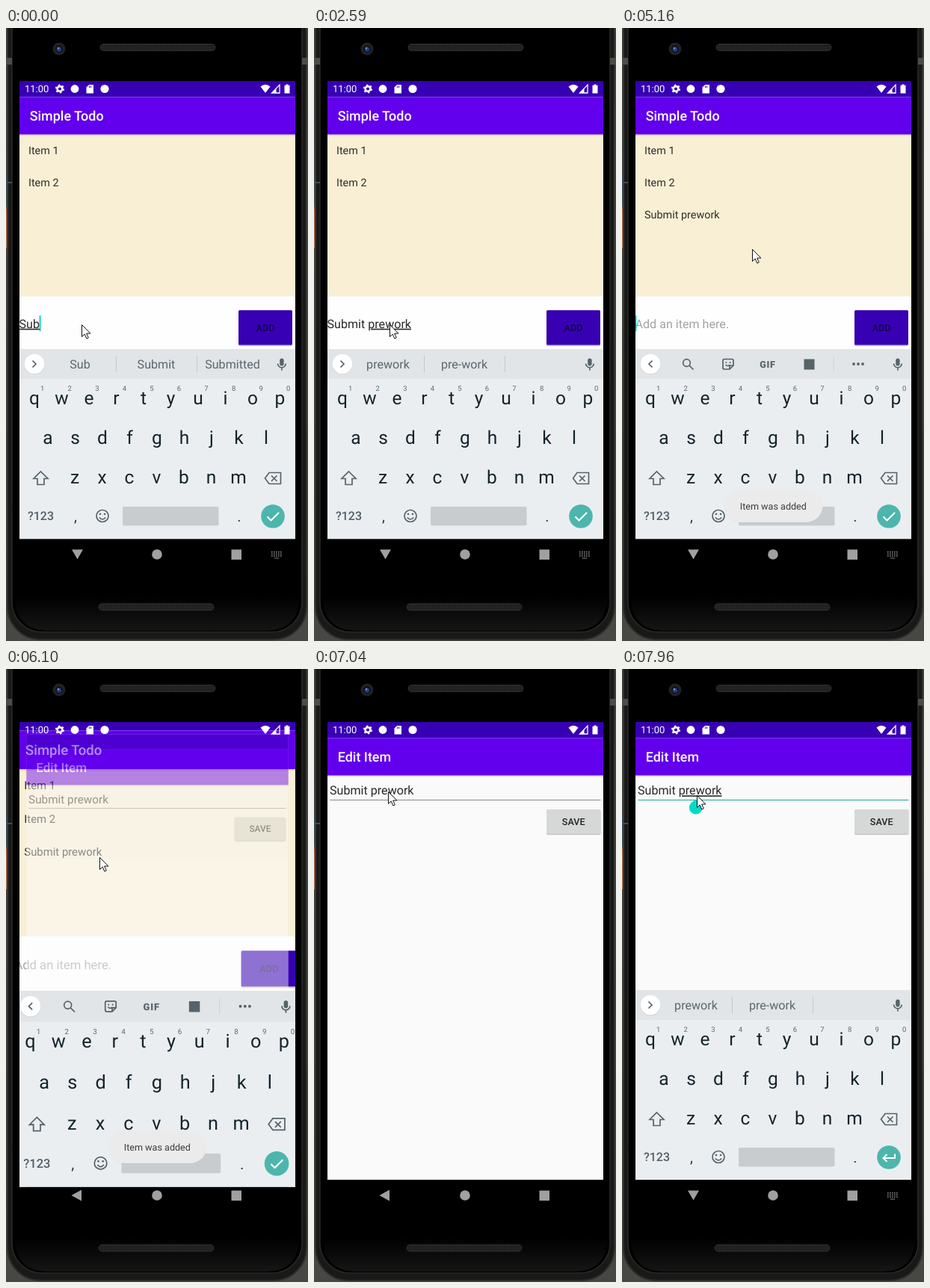
These frames come from a looping animation (404x821 px, 8 s). An HTML page:

```html
<!DOCTYPE html>
<html lang="en">
<head>
<meta charset="utf-8">
<title>Simple Todo</title>
<style>
html, body { margin: 0; width: 100%; height: 100%; overflow: hidden; background: #000; }
svg { display: block; width: 100vw; height: 100vh; }
text { font-family: Roboto, sans-serif; white-space: pre; text-rendering: geometricPrecision; }
.m { font-weight: 500; }
.mid { text-anchor: middle; }
.u { text-decoration: underline #444 .9px; }
.ic { fill: none; stroke: #56636a; stroke-width: 1.7; }
</style>
</head>
<body>
<svg id="stage" viewBox="0 0 404 821" preserveAspectRatio="none"></svg>
<script>
const LOOP = 8000;

const rect = (x, y, w, h, fill, more = '') =>
  `<rect x="${x}" y="${y}" width="${w}" height="${h}" fill="${fill}" ${more}/>`;
const circle = (x, y, r, fill, more = '') =>
  `<circle cx="${x}" cy="${y}" r="${r}" fill="${fill}" ${more}/>`;
const path = (d, more = 'class="ic"') => `<path d="${d}" ${more}/>`;
const text = (x, y, size, fill, str, more = '') =>
  `<text x="${x}" y="${y}" font-size="${size}" fill="${fill}" ${more}>${str}</text>`;
const group = (id, body, more = '') => `<g id="${id}" ${more}>${body}</g>`;

const defs = `<defs>
  <clipPath id="screen"><rect x="18" y="71" width="369" height="656"/></clipPath>
  <clipPath id="aboveNav"><rect x="18" y="71" width="369" height="613.3"/></clipPath>
  <linearGradient id="shade" x2="0" y2="1"><stop stop-color="#000" stop-opacity=".16"/>
    <stop offset="1" stop-color="#000" stop-opacity="0"/></linearGradient>
  <linearGradient id="rim" x2="0" y2="1"><stop stop-color="#2c2c2a"/>
    <stop offset=".3" stop-color="#3a3a38"/><stop offset="1" stop-color="#2c2c2a"/></linearGradient>
  <linearGradient id="desk" x2="0" y2="1"><stop stop-color="#35505c"/>
    <stop offset=".4" stop-color="#4a5a60"/><stop offset=".5" stop-color="#b56a42"/>
    <stop offset="1" stop-color="#c08050"/></linearGradient>
  <linearGradient id="chin" x2="0" y2="1"><stop stop-color="#000"/><stop offset="1" stop-color="#161616"/></linearGradient>
  <pattern id="mesh" width="3" height="3" patternUnits="userSpaceOnUse">
    <rect width="3" height="3" fill="#1d1d1d"/><circle cx="1.5" cy="1.5" r=".8" fill="#343434"/></pattern>
</defs>`;

const grille = (x, y) => rect(x, y, 154, 9, 'url(#mesh)', 'rx="4.5" stroke="#2e2e2e"');

const phone = rect(0, 0, 404, 821, '#474743')
  + rect(0, 195, 2, 100, 'url(#desk)')
  + rect(2, -60, 400, 879, '#191918', 'rx="44" stroke="url(#rim)" stroke-width="2"')
  + rect(8, -60, 388, 869, '#000', 'rx="40" stroke="#2a2a29" stroke-width="1.5"')
  + path('M11 762H393Q391 806 350 807H54Q13 806 11 762Z', 'fill="url(#chin)"')
  + rect(0, 40, 8, 9, '#4c4c49') + rect(396, 40, 8, 9, '#4c4c49')
  + rect(0, 206, 8, 2, '#4c4c49')
  + circle(71, 28, 8.5, '#202226') + circle(71, 28, 5, '#10131f')
  + circle(71, 28.5, 3, '#23408f') + circle(70, 27, 1.2, '#7d9be0')
  + grille(126, 21.5) + grille(124, 771);

const bars = title => rect(18, 71, 369, 21.5, '#3700b3') + rect(18, 92.5, 369, 50, '#6200ee')
  + text(31.7, 124, 17.95, '#fff', title, 'class="m"') + rect(18, 142.5, 369, 3, 'url(#shade)');

const button = (x, y, w, h, fill, ink, label) =>
  rect(x, y + 1, w, h + .8, '#000', 'rx="2" opacity=".2"') + rect(x, y, w, h, fill, 'rx="1.5"')
  + text(x + w / 2, y + h / 2 + 4.6, 12.6, ink, label, 'class="m mid"');

const navBar = rect(18, 684.3, 369, 43, '#000');

const item = (n, label) => text(30, 169 + 43.1 * n, 14.4, '#2e2c26', label, `id="item${n}"`);

const home = rect(18, 71, 369, 613.3, '#fefefe') + navBar + rect(18, 142, 369, 217.5, '#f8efd5') + bars('Simple Todo')
  + item(0, 'Item 1') + item(1, 'Item 2') + item(2, 'Submit prework')
  + `<text id="input" x="17.5" y="401.7" font-size="16.1" fill="#282828"><tspan id="done"></tspan><tspan id="word" class="u"></tspan></text>`
  + text(17.5, 401.7, 16.1, '#a2a2a2', 'Add an item here.', 'id="hint"')
  + rect(0, 385, 1.8, 21, '#03d0bd', 'id="caret"')
  + button(311, 378, 72, 46.5, '#3700b3', '#12003c', 'ADD');

const edit = rect(18, 71, 369, 613.3, '#fafafa') + navBar + bars('Edit Item')
  + `<text x="21" y="168.3" font-size="16.1" fill="#282828">Submit <tspan id="editWord">prework</tspan></text>`
  + rect(21.5, 175, 362, 1, '#868686', 'id="rule"')
  + button(311, 188, 72.5, 32.5, '#d6d7d7', '#222', 'SAVE')
  + path('M98.7 174.5l5.7 4.6a8.8 8.8 0 1 1-11.4 0z', 'id="handle" fill="#03dac5"');

const keyRow = (keys, x, y) => [...keys].map((k, i) =>
  text(x + 36.5 * i, y, 24.5, '#13242b', k, 'class="mid"')).join('');
const digits = [...'1234567890'].map((d, i) =>
  text(48.7 + 36.55 * i, 486, 9.5, '#5c696f', d, 'class="mid"')).join('');

const suggest = [99, 201, 303].map((x, i) =>
  text(x, 456, 16.1, '#5a676d', '', `class="mid" id="s${i}"`)).join('')
  + path('M147.5 439v22M255.5 439v22', 'stroke="#c2c8cb"') + path('M35.5 445.5l4.5 4.5-4.5 4.5');

const tools = path('M40.5 445.5l-4.5 4.5 4.5 4.5')
  + circle(86.5, 448.5, 4.8, 'none', 'class="ic"') + path('M90 452l5.5 5.5')
  + path('M137 443.5h10a2 2 0 0 1 2 2v6.5l-5 5h-7a2 2 0 0 1-2-2v-9.5a2 2 0 0 1 2-2zM149 452h-5v5M138.5 451q3 3 5.5 0')
  + circle(139.3, 448, 1, '#56636a') + circle(144.7, 448, 1, '#56636a')
  + text(195, 454.7, 12.5, '#56636a', 'GIF', 'class="mid" font-weight="900" letter-spacing=".8"')
  + rect(243.5, 443.5, 14, 14, '#56636a') + path('M283 440v20', 'stroke="#cdd2d5"')
  + [310, 316, 322].map(x => circle(x, 450, 1.9, '#56636a')).join('');

const keyboard = rect(18, 430, 369, 254.3, '#ebeef1') + rect(18, 430, 369, 40, '#e1e5e8')
  + circle(38, 450.7, 13.6, '#000', 'opacity=".1"') + circle(38, 450, 13.3, '#fff')
  + group('suggest', suggest) + group('tools', tools)
  + rect(366.2, 442.5, 5.4, 10, '#56636a', 'rx="2.7"') + path('M363.6 449.5a5.3 5.3 0 0 0 10.6 0M369 455v3.5')
  + digits + keyRow('qwertyuiop', 38, 504) + keyRow('asdfghjkl', 56, 556.8) + keyRow('zxcvbnm', 92, 610)
  + path('M46.5 594l9.5 9.5h-5v8h-9v-8h-5z')
  + path('M352 595.5h15.5v15h-15.5l-5.5-7.5zM355 599.5l7.5 7.5M362.5 599.5l-7.5 7.5')
  + text(46.5, 659.3, 16, '#526067', '?123', 'class="m mid"')
  + text(93, 661, 20, '#2b3a41', ',', 'class="mid"') + text(312, 661, 20, '#2b3a41', '.', 'class="mid"')
  + circle(129, 653.5, 8, 'none', 'class="ic"') + path('M124.8 655.5q4.2 5 8.4 0')
  + circle(126, 651, 1.3, '#56636a') + circle(132, 651, 1.3, '#56636a')
  + rect(156, 641, 128.5, 25.5, '#c8cccf', 'rx="2"') + circle(357, 654, 15.8, '#4db6ac')
  + path('M349.5 654.5l5 5 10.5-10.5', 'id="check" fill="none" stroke="#fff" stroke-width="2"')
  + path('M365 649.5v5.5h-15M354.5 650l-5 5 5 5', 'id="enter" fill="none" stroke="#fff" stroke-width="2"');

const toast = rect(137, 618.5, 131.5, 44, '#000', 'rx="22" opacity=".05"')
  + rect(137, 618, 131.5, 44, '#ebebec', 'rx="22"')
  + text(202.3, 645, 12.6, '#3c3c3c', 'Item was added', 'class="mid"');

let dots = '';
for (let i = 0; i < 15; i++) dots += rect(355 + i % 5 * 3, 701 + (i / 5 | 0) * 2.7, 1.6, 1.5, '#8c8c8c');
dots += rect(359, 709.5, 6, 1, '#8c8c8c');

const nav = path('M88 698.5h15l-7.5 13z', 'id="down" fill="#a0a0a0"')
  + path('M101 697.5v15l-13.5-7.5z', 'id="back" fill="#a0a0a0"')
  + circle(202, 705, 6.8, '#a0a0a0') + rect(301.5, 698.5, 13.5, 13.5, '#a0a0a0') + group('dots', dots);

const status = text(25, 86.3, 13, '#fff', '11:00')
  + circle(72, 81.5, 3.4, 'none', 'stroke="#fff" stroke-width="2.6"')
  + circle(72, 81.5, 5.2, 'none', 'stroke="#fff" stroke-width="1.7" stroke-dasharray="2.4 3.045"')
  + circle(92, 81.5, 5.4, '#fff')
  + path('M111 76h6v11.5h-9.5v-8z', 'fill="#fff"') + path('M111.5 77.5v2.5M113.5 77.5v2.5', 'stroke="#3700b3"')
  + circle(132, 81.5, 5.6, '#fff')
  + path('M340.5 78.5q6.5-5.5 13 0l-6.5 8.5z', 'fill="#fff"')
  + path('M366 76v11h-10.5z', 'fill="none" stroke="#fff" stroke-width="1.3"') + path('M361.5 81v6h-6z', 'fill="#fff"')
  + path('M374.5 75.5h3v1.3h2v10.7h-7v-10.7h2z', 'fill="#fff"');

const pointer = path('M0 0V16l3.7-3.5 2.6 6 2.5-1.1-2.6-5.8h5.2z',
  'fill="#fff" stroke="#111" stroke-width="1"');

const stage = document.getElementById('stage');
stage.innerHTML = defs + phone + `<g clip-path="url(#screen)">`
  + rect(18, 71, 369, 656, '#000') + group('home', home) + group('edit', edit)
  + group('kbClip', group('kb', keyboard)) + group('toast', toast) + group('nav', nav) + status + '</g>'
  + group('mouse', pointer);

const el = {};
stage.querySelectorAll('[id]').forEach(n => el[n.id] = n);
const show = (id, on) => el[id].setAttribute('visibility', on ? 'inherit' : 'hidden');
const fade = (id, v) => el[id].setAttribute('opacity', v);
const move = (id, v) => el[id].setAttribute('transform', v);

// time, typed text, suggestions
const TYPED = [
  [0, 'Sub', 'Sub|Submit|Submitted'],
  [250, 'Subm', 'Subm|Submit|Submitted'],
  [530, 'Submi', 'Submi|Submit|Submitted'],
  [680, 'Submit', 'Submit|Submitted|Submits'],
  [1090, 'Submit ', 'the|a|your'],
  [1360, 'Submit pr', 'pr|pretty|problem'],
  [1490, 'Submit pre', 'pre|pretty|prefer'],
  [1790, 'Submit prew', 'prew|preview|prewar'],
  [1920, 'Submit prewo', 'prewo|prework|prewar'],
  [2050, 'Submit prewor', 'prewor|prework|'],
  [2180, 'Submit prework', 'prework|pre-work|']
];

// start, end, pictures in the burst
const BURSTS = [[3140, 4070, 8], [4350, 5280, 8], [5400, 5550, 2], [6100, 7040, 8], [7160, 7960, 7]];

const MOUSE = [
  [0, 101, 397], [3010, 101, 397], [3140, 120, 398], [3405, 245, 403], [3540, 310, 405], [3670, 337, 403],
  [4350, 337, 403], [4483, 325, 394], [4749, 245, 340], [5015, 183, 304], [5147, 174, 296],
  [5280, 169, 290], [5400, 150, 272], [5550, 126, 256], [6100, 125, 252], [6500, 125, 252],
  [6770, 108, 190], [6906, 100, 166], [7040, 99, 164], [7427, 99, 164], [7693, 100, 169], [8000, 100, 169]
];

const clamp = v => Math.max(0, Math.min(1, v));
const ramp = (t, a, b) => clamp((t - a) / (b - a));

function snap(t) {
  let s = 0;
  for (const [a, b, n] of BURSTS) {
    if (t < a) break;
    const step = (b - a) / (n - 1);
    s = a + step * Math.min(n - 1, Math.floor((t - a + 16) / step));
  }
  return s;
}

function track(keys, t) {
  const i = Math.max(1, keys.findIndex(k => k[0] >= t));
  const [a, b] = [keys[i - 1], keys[i]];
  const p = ramp(t, a[0], b[0]);
  return [a[1] + (b[1] - a[1]) * p, a[2] + (b[2] - a[2]) * p];
}

const zoom = (s, dy = 0) => `translate(${202.5 * (1 - s)} ${399 * (1 - s) + dy}) scale(${s})`;

function drawInput(t) {
  const added = t >= 4350;
  const [, typed, words] = TYPED.filter(k => k[0] <= t).pop();
  const cut = typed.indexOf(' ') + 1;
  el.done.textContent = typed.slice(0, cut);
  el.word.textContent = typed.slice(cut);
  words.split('|').forEach((w, i) => el['s' + i].textContent = w);
  show('input', !added);
  show('hint', added);
  show('item2', added);
  const off = (t >= 2590 && t < 3260) || (t >= 3930 && t < 4350) || (t >= 4870 && t < 5010) || t >= 5400;
  show('caret', !off);
  el.caret.setAttribute('x', added ? 17.6 : 17.2 + el.input.getComputedTextLength());
}

function drawKeyboard(t, s) {
  const editing = t >= 7000;
  const up = editing ? ramp(s, 7293, 7560) : 1;
  const out = ramp(s, 6100, 6233);
  const open = editing ? s > 7350 : s < 6300;
  const icons = t >= 4350 && s < 7690;
  show('kb', open);
  show('suggest', open && !icons);
  show('tools', open && icons);
  show('check', open && !editing);
  show('enter', open && editing);
  el.kbClip.setAttribute('clip-path', editing ? 'url(#aboveNav)' : 'none');
  if (editing) move('kb', `translate(0 ${(1 - up) * 90})`);
  else move('kb', s < 6100 ? '' : zoom(1.033 + .016 * out, 31 * out));
  fade('kb', editing ? up : 1 - .76 * out);
  const down = editing ? s > 7350 : s < 6100;
  show('down', down);
  show('back', !down);
  show('dots', down);
}

function draw(t) {
  const s = snap(t);
  const opening = s >= 6100;
  const p = ramp(s, 6100, 6233);
  drawInput(t);
  drawKeyboard(t, s);

  show('home', s < 6450);
  move('home', opening ? zoom(1.033 + .016 * p) : '');
  show('edit', opening);
  move('edit', zoom(.95 + .0445 * p + .0055 * ramp(s, 6233, 6367)));
  fade('edit', .45 + .55 * p);

  const focus = s >= 7160;
  el.rule.setAttribute('fill', focus ? '#1fa99c' : '#868686');
  show('handle', s > 7280);
  el.editWord.setAttribute('class', s > 7690 ? 'u' : '');

  fade('toast', s < 6100 ? ramp(s, 4483, 4749) : 1 - .5 * p - .5 * ramp(s, 6233, 6367));
  move('mouse', `translate(${track(MOUSE, s).map(v => v + .5).join(' ')})`);
}

const start = performance.now();
function frame() {
  draw((performance.now() - start) % LOOP);
  requestAnimationFrame(frame);
}
frame();
</script>
</body>
</html>
```
